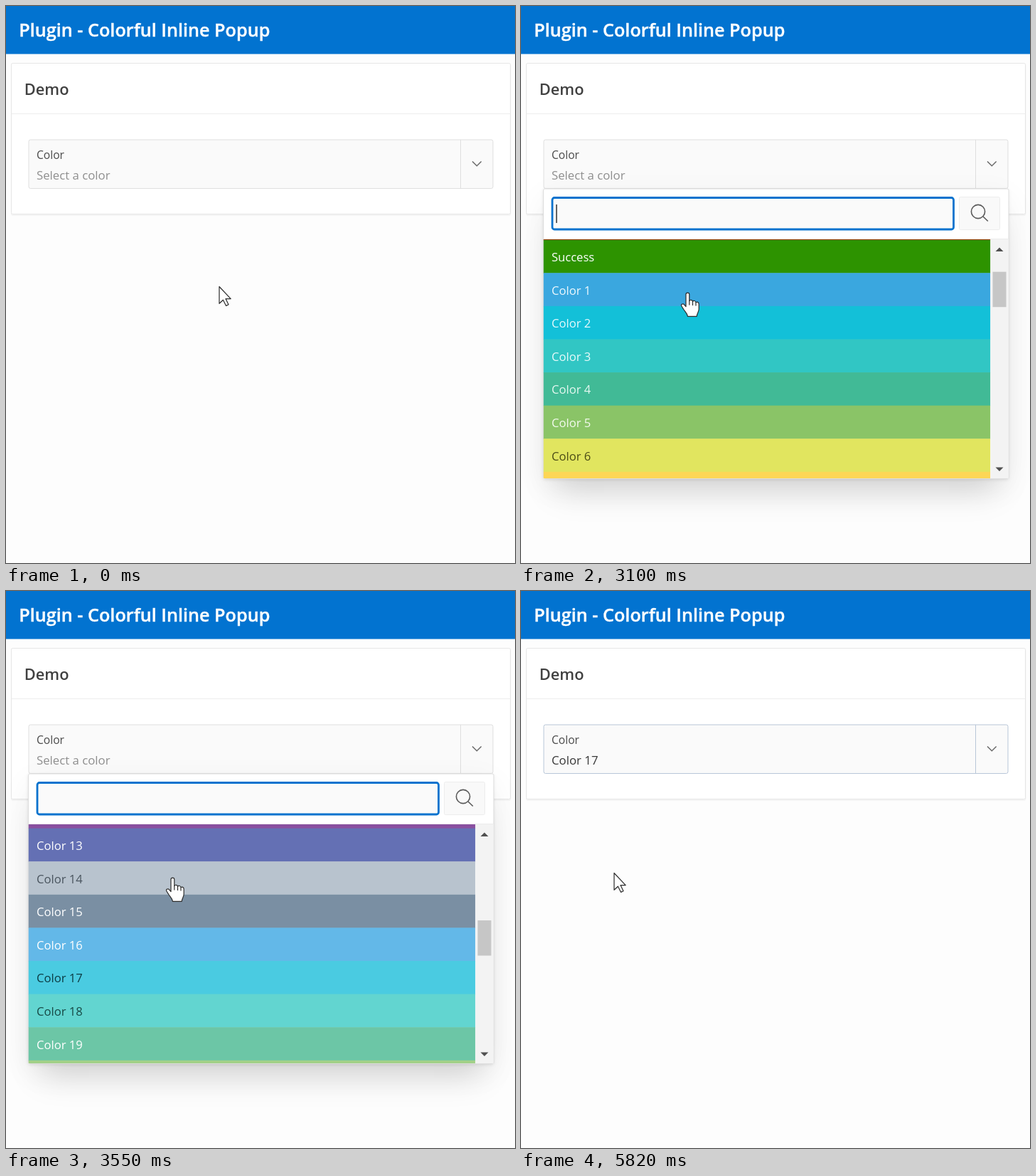
These frames come from a looping animation (716 px wide and 783 px high, 5.88 s). An HTML page:

```html
<!DOCTYPE html>
<html lang="en">
<head>
<meta charset="utf-8">
<title>Colorful Inline Popup</title>
<style>
  html, body { margin: 0; width: 100%; height: 100%; overflow: hidden; background: #fdfdfd; }
  #stage { position: relative; width: 716px; height: 783px; overflow: hidden; }
  svg { position: absolute; left: 0; top: 0; }
  text { font-family: "Open Sans", "Noto Sans", sans-serif; font-size: 16.6px; }
  .title { font-size: 25.2px; font-weight: 600; fill: #fff; stroke: #fff; stroke-width: .4; }
  .shadow {
    position: absolute; left: 31px; top: 257px; width: 655px; height: 408px; border-radius: 2px;
    box-shadow: 0 34px 44px -18px rgba(0,0,0,.15), 0 12px 46px rgba(0,0,0,.055), 0 1px 4px rgba(0,0,0,.1);
  }
  .cursor path { fill: #fff; stroke: #2c2c2c; stroke-width: 1.2; stroke-linejoin: round; }
</style>
</head>
<body>
<div id="stage">
  <svg width="716" height="783">
    <rect width="716" height="67.5" fill="#0273d0"/>
    <text class="title" x="18.3" y="43">Plugin - Colorful Inline Popup</text>
    <rect x="8" y="81.5" width="701.5" height="212.5" rx="2" fill="none" stroke="#f4f4f4" stroke-width="2"/>
    <rect x="7.5" y="80.5" width="702" height="212" rx="2" fill="#fff" stroke="#e6e6e6"/>
    <path d="M8 151.5H709" stroke="#eee"/>
    <text x="25.8" y="124.7" fill="#404040" style="font-size:21.8px;font-weight:600">Demo</text>
    <g id="field" fill="#fafafa">
      <rect x="32" y="188" width="653" height="68.5" rx="2.5"/>
      <path d="M639.5 188V256.5"/>
    </g>
    <path d="M656 218.5L662.3 224.7L668.6 218.5" fill="none" stroke="#6a6a6a" stroke-width="1.5"/>
    <text x="43" y="214.8" fill="#4a4a4a" style="font-size:15.6px">Color</text>
    <text id="value" x="43" y="244" style="font-size:16.8px"></text>
  </svg>

  <div id="popup">
    <div class="shadow"></div>
    <svg width="716" height="783">
      <clipPath id="view"><rect x="31.5" y="328" width="629" height="336"/></clipPath>
      <rect x="31.5" y="257" width="654.5" height="407.5" rx="2" fill="#fff" stroke="#dedede"/>
      <path d="M32 327.5H686" stroke="#ececec"/>
      <rect x="44" y="269.5" width="564.5" height="44.5" rx="3" fill="#fafafa" stroke="#0572ce" stroke-width="2.8"/>
      <path id="caret" d="M50 279V305" stroke="#222" stroke-width="1.4"/>
      <rect x="616.5" y="268.5" width="57" height="46" rx="2" fill="#f9f9f9" stroke="#ededed"/>
      <g fill="none" stroke="#5a5a5a" stroke-width="1.6">
        <circle cx="643" cy="289" r="9.6"/>
        <path d="M650 296L656.8 302.5"/>
      </g>
      <g clip-path="url(#view)"><g id="rows"></g></g>
      <rect x="660.5" y="328" width="25" height="336" fill="#f3f3f3"/>
      <path id="up" d="M667.5 345L673 339.5L678.5 345Z"/>
      <path d="M667.5 648.5L673 654L678.5 648.5Z" fill="#505050"/>
      <rect id="thumb" x="663.5" width="19" height="49.5" fill="#c6c6c6"/>
    </svg>
  </div>

  <svg width="716" height="783" class="cursor">
    <g id="arrow"><path d="M0 .5V24.3L5.4 19.2L9.6 27.4L13 25.8L9 17.6H16.2Z"/></g>
    <g id="beam">
      <path d="M-4.5 -11.5H-1.5L0 -10L1.5 -11.5H4.5M0 -10V10M-4.5 11.5H-1.5L0 10L1.5 11.5H4.5" style="fill:none;stroke-width:1.6"/>
    </g>
    <g id="hand">
      <path d="M-2 2.5C-2 -.8 2.8 -.8 2.8 2.5V11.5C3.5 9.6 7.3 9.9 7.5 12.5C8.6 10.8 11.7 11.2 12 13.8C13.4 12.4 16.2 13.2 16.2 16V23C16.2 27 13.8 28.5 13.2 33.3H.5C-.4 28.5 -3.8 26.5 -5.8 22.6L-8.2 18.7C-9.3 16.3 -6 14.6 -4.2 17L-2 19.6Z"/>
      <path d="M2.8 11V17.5M7.5 12.5V18M12 14V18.5" style="fill:none"/>
    </g>
  </svg>
</div>

<script>
const LOOP = 5880, STEP = 50, OPEN = 1550, CLOSE = 4750, ROW = 46.6;
const $ = id => document.getElementById(id);
const svgNode = (name, attrs, parent) => {
  const node = document.createElementNS("http://www.w3.org/2000/svg", name);
  for (const key in attrs) node.setAttribute(key, attrs[key]);
  return parent.appendChild(node);
};

// fill, then the text colour where it is not white
const rows = `0273d0 fecf2f/2e2600 d01000 2d9300 3aa7df/eef8fd 13c0d8/e6f9fc 31c6c4/e9fafa
  41ba96/e6f8f1 8ac467/f4faef e1e55f/4b4c16 fdd656/66521a f08e49/fdeee2 ee6660/fdeceb
  eb6894 d25ea6 8a50a0 6470b4 b8c3ce/49545e 7a8fa3 63b8e8 4acbe1/0c3c44 62d5d0/174844
  6cc6a6 a2d088/37501f e8ea80/5a5c1c fddd79/66521a`.trim().split(/\s+/);
const named = ["Info", "Warning", "Danger", "Success"];

rows.forEach((pair, i) => {
  const [fill, ink] = pair.split("/");
  const y = 328 + i * ROW;
  svgNode("rect", { x: 31.5, y, width: 629, height: ROW + .5, fill: "#" + fill }, $("rows"));
  svgNode("text", { x: 43, y: y + 30.3, fill: "#" + (ink || "fff"), "font-weight": ink ? 400 : 500 }, $("rows"))
    .textContent = named[i] || "Color " + (i - 3);
});

const linear = p => p;
const easeIn = p => p * p;
const easeOut = p => p * (2 - p);
const easeBoth = p => p * p * (3 - 2 * p);

// Each key: time, values, easing used to reach it
const pointer = [
  [1000, [300, 394]],
  [1050, [294, 370], linear],
  [1400, [220, 227], easeOut],
  [2200, [220, 227], linear],
  [2700, [234, 403], easeBoth],
  [4700, [234, 403], linear],
  [4900, [131, 396], easeOut]
];
const scroll = [
  [2750, [0]],
  [3300, [343.6], easeIn],
  [3550, [740], linear],
  [3800, [873.7], easeOut]
];

function at(keys, t) {
  if (t <= keys[0][0]) return keys[0][1];
  const n = keys.findIndex(k => t < k[0]);
  if (n < 0) return keys[keys.length - 1][1];
  const [t0, a] = keys[n - 1], [t1, b, ease] = keys[n];
  const p = ease((t - t0) / (t1 - t0));
  return a.map((v, i) => v + (b[i] - v) * p);
}

const show = (id, on) => { $(id).style.display = on ? "" : "none"; };

function draw(time) {
  const t = Math.floor(time / STEP) * STEP;
  const open = t >= OPEN && t < CLOSE, chosen = t >= CLOSE;

  show("popup", open);
  show("caret", t % 1000 < 500);
  $("value").textContent = chosen ? "Color 17" : "Select a color";
  $("value").setAttribute("fill", chosen ? "#383838" : "#8f8f8f");
  $("field").setAttribute("stroke", chosen ? "#b8c6d8" : "#dfdfdf");

  const [top] = at(scroll, t);
  $("rows").setAttribute("transform", `translate(0 ${-top})`);
  $("thumb").setAttribute("y", 353 + top * .1487);
  $("up").setAttribute("fill", top ? "#505050" : "#a6a6a6");

  const [x, y] = at(pointer, t);
  const kind = open && y >= 328 ? "hand" : y > 188 && y < (open ? 328 : 257) ? "beam" : "arrow";
  for (const id of ["arrow", "beam", "hand"]) show(id, id === kind);
  $(kind).setAttribute("transform", `translate(${x} ${y})`);
}

const start = performance.now();
function tick() {
  draw((performance.now() - start) % LOOP);
  requestAnimationFrame(tick);
}
tick();
</script>
</body>
</html>
```
